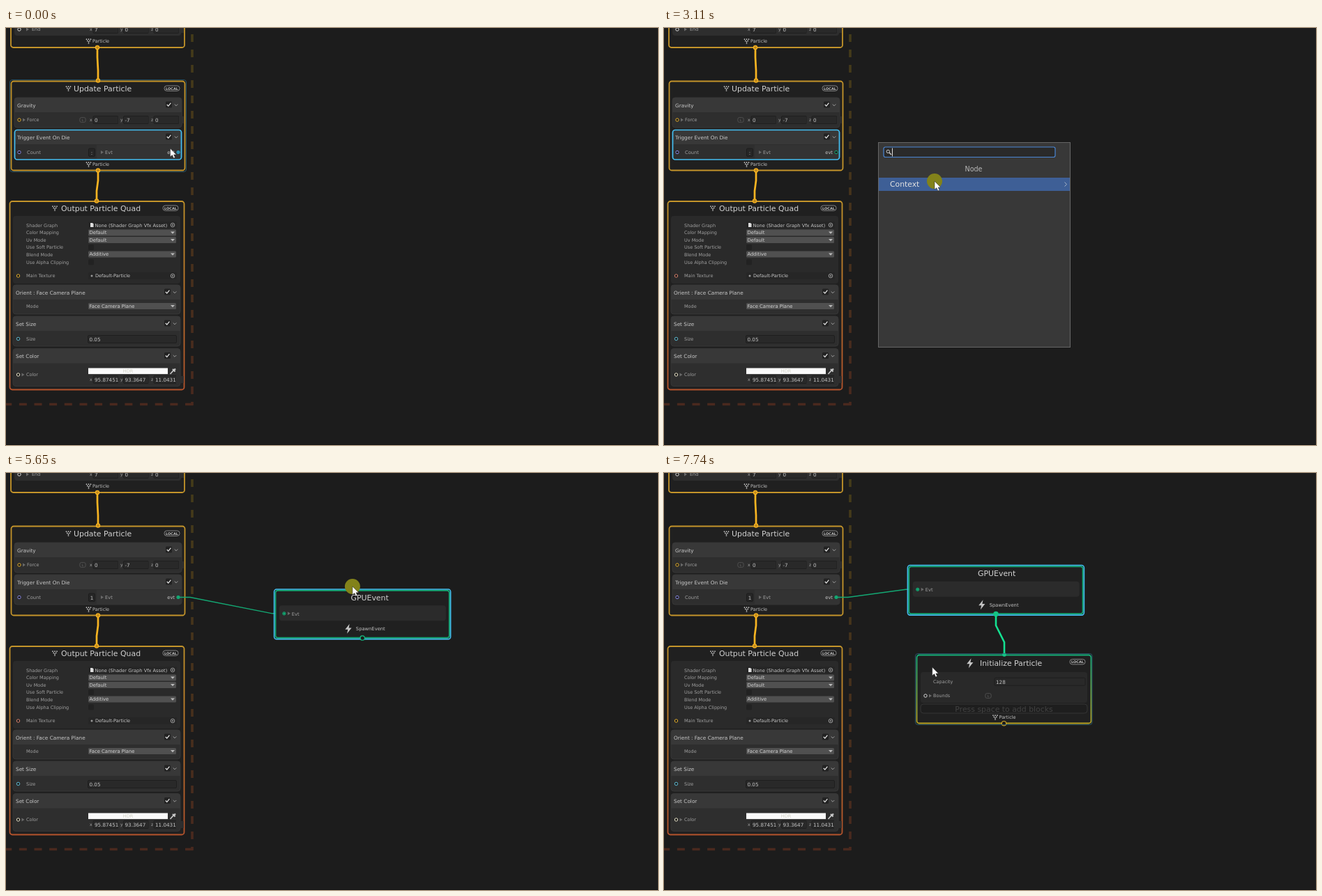
An HTML page that plays this animation: 935x599 px, repeating every 8000 ms.

```html
<!DOCTYPE html>
<html lang="en">
<head>
<meta charset="utf-8">
<title>Node graph</title>
<style>
html, body { margin: 0; width: 100%; height: 100%; overflow: hidden; background: #1c1c1c; }
svg { display: block; width: 100vw; height: 100vh; }
text { font-family: "DejaVu Sans", Verdana, sans-serif; white-space: pre; }
</style>
</head>
<body>
<svg id="stage" viewBox="0 0 935 599"></svg>
<script>
const LOOP = 8000;
const GOLD = '#c4942a', GREEN = '#13a873', BLUE = '#43bdf0', HOVER = '#2c647d', BG = '#1c1c1c';

// ---- markup helpers ----
const rect = (x, y, w, h, fill, more = '') =>
  `<rect x="${x}" y="${y}" width="${w}" height="${h}" fill="${fill}" ${more}/>`;
const frame = (x, y, w, h, stroke, fill = 'none', width = 1.8, more = '') =>
  rect(x, y, w, h, fill, `rx="3.5" stroke="${stroke}" stroke-width="${width}" ${more}`);
const path = (d, stroke, width = 1, more = '') =>
  `<path d="${d}" fill="none" stroke="${stroke}" stroke-width="${width}" ${more}/>`;
// y is the middle of the capitals
const text = (x, y, s, size = 6.5, fill = '#a0a0a0', more = '') =>
  `<text x="${x}" y="${y + size * 0.36}" font-size="${size}" fill="${fill}" ${more}>${s}</text>`;
const group = (id, body, more = '') => `<g id="${id}" ${more}>${body}</g>`;
const MID = 'text-anchor="middle"';

const title = (x, y, s, more) => text(x, y, s, 10.9, '#d2d2d2', more);
const port = (x, y, color, more = '') =>
  `<circle class="port" cx="${x}" cy="${y}" r="2.2" fill="${BG}" stroke="${color}" stroke-width="1" ${more}/>`;
const anchor = (x, y) =>
  `<circle class="anchor" cx="${x}" cy="${y}" r="2.6" fill="#c08a1c" stroke="#f8b422" stroke-width="1.2"/>`;
const tri = (x, y) => `<path d="M${x - 2} ${y - 2.5}l4 2.5l-4 2.5z" fill="#6a6a6a"/>`;
const chevron = (x, y) => path(`M${x - 2.3} ${y - 1}l2.3 2.3l2.3 -2.3`, '#a0a0a0', 1);
const tick = (x, y) => rect(x - 4.5, y - 4.5, 9, 9, '#222', 'rx="1.5"') +
  path(`M${x - 2.7} ${y}l2 2.1l3.6 -4.4`, '#e4e4e4', 1.3);
const local = (x, y) => rect(x, y, 22, 7.4, '#1c1c1c', 'rx="3.5" stroke="#a0a0a0" stroke-width=".8"') +
  text(x + 11, y + 3.7, 'LOCAL', 5, '#c4c4c4', `${MID} font-weight="bold"`);
const space = (x, y) => rect(x - 4.2, y - 3.5, 8.4, 7, 'none', 'rx="2.5" stroke="#565656" stroke-width=".8"') +
  text(x, y, 'L', 4.6, '#686868', MID);
const bolt = (x, y) =>
  `<path transform="translate(${x} ${y})" d="M1.8 -7L-4.5 1H-.6L-1.8 7L4.7 -1.4H.7Z" fill="#c4c4c4"/>`;
const sparks = (x, y) => {
  const dots = [[-3, -2.8], [0, -2.8], [3, -2.8], [-1.7, -.6], [1.7, -.6], [0, .9], [0, 3]];
  return dots.map(([a, b]) => `<circle cx="${x + a}" cy="${y + b}" r=".85" fill="#c8c8c8"/>`).join('');
};
const flow = (x, y) => sparks(x, y) + text(x + 5.5, y, 'Particle', 6.5, '#c0c0c0');
const field = (x, y, w, s, h = 11) =>
  rect(x, y - h / 2, w, h, '#292929', 'rx="1.5" stroke="#1c1c1c" stroke-width=".8"') +
  text(x + 2, y + .5, s, 7.2, '#c4c4c4');
const vector = (y, values) => values.map((v, i) =>
  field(125 + 43.5 * i, y, 36, v) + rect(161 + 43.5 * i, y - 5, 7, 10, '#2e2e2e') +
  text(120 + 44 * i, y, 'xyz'[i], 6, '#808080')).join('') + text(120, y, 'x', 6, '#808080') +
  text(164, y, 'y', 6, '#808080') + text(208, y, 'z', 6, '#808080');
const drop = (y, s) => rect(118, y - 4.5, 126, 9, '#505050', 'rx="1.5"') +
  text(119.5, y, s, 6.8, '#d4d4d4') + `<path d="M236 ${y - 1.5}h6l-3 3.2z" fill="#bbb"/>`;
const block = (x, y, h, s, cx = x + 219.5) =>
  rect(x, y, 240, h, '#2e2e2e', 'rx="4" stroke="#3a3a3a" stroke-width=".8"') +
  `<path d="M${x} ${y + 21}v-17q0 -4 4 -4h232q4 0 4 4v17z" fill="#383838"/>` +
  text(x + 4, y + 11, s, 7.3, '#c8c8c8') + tick(cx + 2, y + 10) + chevron(cx + 12.5, y + 10.5);
const picker = y => `<circle cx="239" cy="${y}" r="2.8" fill="none" stroke="#aaa" stroke-width=".9"/>` +
  `<circle cx="239" cy="${y}" r="1" fill="#aaa"/>`;

// ---- parts ----
function defs() {
  const grad = (id, y1, y2, a, b) =>
    `<linearGradient id="${id}" gradientUnits="userSpaceOnUse" x1="0" x2="0" y1="${y1}" y2="${y2}">` +
    `<stop offset="0" stop-color="${a}"/><stop offset="1" stop-color="${b}"/></linearGradient>`;
  return '<defs>' + grad('outEdge', 249, 520, '#c4942a', '#b5532c') +
    grad('initEdge', 261, 360, '#14b078', '#b8a324') +
    grad('dash', 0, 541, '#443c19', '#4a291e') + '</defs>';
}

function backdrop() {
  return rect(0, 0, 935, 599, BG) + rect(0, 598, 935, 1, '#141414') +
    path('M267 9V542', 'url(#dash)', 3.6, 'stroke-dasharray="11 11"') +
    path('M268 540.5H0', '#4a291e', 3.4, 'stroke-dasharray="11 10.65"');
}

function upperContext() {
  return frame(7, -40, 249, 68, GOLD, '#202020') + rect(12, -30, 239, 41, '#2e2e2e', 'rx="4"') +
    port(19, 2, '#ddd') + tri(31, 2) + text(37, 2, 'End') + vector(2, ['7', '0', '0']) + flow(118.5, 19);
}

function updateContext() {
  return frame(7.5, 76.5, 249, 128, GOLD, '#202020') + sparks(89.5, 87) +
    title(97, 87, 'Update Particle') + local(227, 83) +
    block(12, 100, 43, 'Gravity') + port(19, 132, '#e0ab2c') + tri(26, 132) + text(30, 132, 'Force') +
    space(110, 132) + vector(132, ['0', '-7', '0']) +
    block(12, 146, 43, 'Trigger Event On Die') + rect(130, 168, 121, 20, '#333') +
    port(19, 178.5, '#8685e0') + text(30, 179, 'Count', 6.7) +
    rect(118.5, 173, 9, 11.5, '#262626', 'rx="1.5" stroke="#1a1a1a" stroke-width=".8"') +
    text(123, 179.3, '', 7.2, '#c8c8c8', `id="count" ${MID}`) +
    tri(138, 178.5) + text(142, 179, 'Evt', 6.7) + text(242, 179, 'evt', 6.7, '#c8c8c8', 'text-anchor="end"') +
    port(247, 178.5, GREEN, 'id="evtPort"') +
    frame(12.5, 146.5, 239, 42.5, BLUE, 'none', 1.7, 'id="blockSel"') + flow(118.5, 196) +
    frame(5.5, 74.5, 253, 132, HOVER, 'none', .8, 'id="updHover"');
}

function outputContext() {
  const labels = ['Shader Graph', 'Color Mapping', 'Uv Mode', 'Use Soft Particle', 'Blend Mode', 'Use Alpha Clipping'];
  const y = i => 283.3 + 10.6 * i;
  const box = i => rect(118, y(i) - 4, 8, 8, '#222', 'rx="1.5"');
  return frame(5.5, 249, 250, 270.5, 'url(#outEdge)', '#202020') + sparks(70, 259) +
    title(79, 259, 'Output Particle Quad') + local(225, 255) +
    rect(10, 270, 240, 97, '#2a2a2a', 'rx="4"') +
    labels.map((s, i) => text(29, y(i), s)).join('') +
    rect(118, 278, 127, 10, '#262626', 'rx="1.5"') +
    '<path d="M121 280h3l1.5 1.5v4.5h-4.5z" fill="#ddd"/>' +
    text(127.5, 283.3, 'None (Shader Graph Vfx Asset)', 6.65, '#c8c8c8') + picker(283) +
    drop(294, 'Default') + drop(304.6, 'Default') + box(3) + drop(325, 'Additive') + box(5) +
    port(17.5, 356, '#e0ab2c', 'id="texPort"') + text(29, 356, 'Main Texture') +
    rect(118, 351, 127, 10, '#262626', 'rx="1.5"') +
    '<circle cx="123" cy="356" r="1.5" fill="#999"/>' +
    text(128, 356, 'Default-Particle', 6.5, '#c8c8c8') + picker(356) +
    block(10, 369, 42, 'Orient : Face Camera Plane') + text(29, 400, 'Mode') + drop(399.5, 'Face Camera Plane') +
    block(10, 414, 43, 'Set Size') + port(17.5, 446.5, '#62c4dc') + text(29, 447, 'Size') +
    field(117.5, 447, 127, '0.05') +
    block(10, 460.5, 54, 'Set Color') + port(17.5, 498, '#e8e2c8') + tri(24.5, 498) + text(29, 498, 'Color') +
    rect(118, 488.5, 114, 8.6, '#fafafa') + text(175, 493, 'HDR', 6.5, '#d2d2c6', MID) +
    path('M235.5 497l4.5 -5', '#ccc', 1.6) + path('M239 490l3.5 3.5M241 491.5l2 -2', '#ccc', 2.2) +
    vector(505, ['95.87451', '93.3647', '11.04314']) + rect(244, 499, 5, 12, '#2e2e2e');
}

function goldLinks() {
  const style = 'stroke-linejoin="round"';
  return path('M131 28V42L132 61V75', '#f8b422', 2.7, style) +
    path('M132 205V219L130 234V248', '#f8b422', 2.7, style) +
    anchor(131, 28) + anchor(132, 75.5) + anchor(132, 204.5) + anchor(130, 248.5);
}

function eventNode() {
  return frame(448.5, 211.5, 249.5, 68, GREEN, '#202020', 2) +
    group('evTitle', title(574.5, 221.5, 'GPUEvent', MID)) +
    rect(454, 233, 239, 22, '#2b2b2b', 'rx="4"') +
    port(461, 244.5, GREEN, 'id="evIn"') + `<circle class="port" cx="461" cy="244.5" r="1.7" fill="${GREEN}"/>` +
    tri(468, 244.5) + text(472, 245, 'Evt', 6.7) +
    bolt(553, 266.5) + text(564, 266.5, 'SpawnEvent', 6.75, '#c0c0c0') +
    frame(446.7, 209.7, 253, 71.6, BLUE, 'none', 1.6, 'id="evSel"') +
    frame(446.7, 209.7, 253, 71.6, HOVER, 'none', .8, 'id="evHover"') +
    `<circle id="evOut" cx="573.3" cy="279.7" r="3.2" stroke="#16c184" stroke-width="1.2"/>`;
}

function initNode() {
  return frame(362.5, 261.5, 250, 98, 'url(#initEdge)', '#202020', 1.8) +
    bolt(438.7, 273.3) + title(453, 273.5, 'Initialize Particle') + local(582, 267.5) +
    rect(368, 286, 239, 44, '#292929', 'rx="4"') +
    text(386, 300, 'Capacity') + field(474, 299.8, 130, '128') +
    port(375, 320, '#ddd') + tri(382, 320) + text(386, 320, 'Bounds') + space(465, 320) +
    rect(368, 332, 239, 13, '#1e1e1e', 'rx="4" stroke="#343434" stroke-width="1"') +
    text(487.5, 338.8, 'Press space to add blocks', 10.9, '#424242', MID) + flow(475, 351) +
    path('M476 203V219L488 243V261', '#14e091', 2.6, 'stroke-linejoin="round"') +
    '<circle cx="476.3" cy="202.6" r="2.8" fill="#14c484"/><circle cx="488" cy="261" r="2.8" fill="#14c484"/>' +
    `<circle cx="487.5" cy="359.7" r="3.2" fill="${BG}" stroke="#d0a524" stroke-width="1.2"/>` +
    frame(360.5, 259.5, 253.5, 102, HOVER, 'none', .8, 'id="initHover"');
}

function popup() {
  return rect(.5, .5, 275, 294, '#383838', 'stroke="#666" stroke-width="1"') +
    rect(8, 7, 246, 14.5, '#2a2a2a', 'rx="2.5" stroke="#4a86d4" stroke-width="1.2"') +
    '<circle cx="14.3" cy="13.4" r="2.2" fill="none" stroke="#ccc"/>' + path('M16 15l3 3', '#ccc', 1.4) +
    rect(20, 8.5, 1, 12, '#ddd') + text(137, 38.5, 'Node', 9.6, '#b8b8b8', MID) +
    rect(1, 51, 274, 19, '#3e5f96', 'id="rowLit"') + text(17, 60.5, 'Context', 10.8, '#e0e0e0') +
    path('M267.5 57.5l3 3l-3 3', '#a8b4c8', 1);
}

const pointer = group('press', '<circle r="11" fill="#82821a"/>') +
  '<path d="M0 0V12L2.9 9.6L4.9 14L7 13L5.1 8.9H8.8Z" fill="#fff" stroke="#222" stroke-width=".5"/>';

document.getElementById('stage').innerHTML = defs() + backdrop() + upperContext() + updateContext() +
  outputContext() + goldLinks() + path('', GREEN, 1.5, 'id="evLink"') + path('', '#1b5f4a', 1.5, 'id="dragLink"') +
  group('event', eventNode()) + path('', '#14a672', 2.6, 'id="flowLink"') + group('init', initNode()) +
  group('popup', popup()) + group('pointer', pointer);

// ---- motion ----
const EASE = {
  both: p => p * p * (3 - 2 * p),
  start: p => p ** 1.4,
  end: p => 1 - (1 - p) ** 2
};
// time, x, y, easing towards this key
const POINTER = [
  [30, 235.5, 173], [280, 246, 178, 'both'], [670, 246, 178], [930, 398, 184, 'start'], [1460, 445, 181, 'end'],
  [1960, 445, 181], [2210, 396.5, 215, 'start'], [2760, 388, 220, 'end'], [3930, 388, 220],
  [4700, 568, 279, 'both'], [4910, 568, 279], [5160, 559, 218, 'both'], [5380, 559, 218],
  [5650, 497, 163, 'start'], [6170, 461, 141, 'end'], [6190, 461, 141], [6520, 475.5, 202.5, 'both'],
  [6690, 475.5, 202.5], [6950, 473, 233, 'both'], [7060, 473, 233], [7480, 384.7, 279, 'both']
];
const EVENT = [[5380, 0, 0], [5650, -62, -42.5, 'start'], [6170, -97.3, -77.2, 'end']];

function at(keys, t) {
  const i = keys.findIndex(k => k[0] > t);
  if (i === 0) return keys[0].slice(1, 3);
  if (i < 0) return keys[keys.length - 1].slice(1, 3);
  const [t0, x0, y0] = keys[i - 1], [t1, x1, y1, ease] = keys[i];
  const p = (EASE[ease] || EASE.both)((t - t0) / (t1 - t0));
  return [x0 + (x1 - x0) * p, y0 + (y1 - y0) * p];
}

const el = id => document.getElementById(id);
const show = (id, on) => { el(id).style.display = on ? '' : 'none'; };
const move = (id, x, y) => el(id).setAttribute('transform', `translate(${x} ${y})`);
const within = (t, ...spans) => spans.some(([a, b]) => t >= a && t < b);
const ports = document.querySelectorAll('.port'), anchors = document.querySelectorAll('.anchor');

function draw(t) {
  const [x, y] = at(POINTER, t);
  const [ex, ey] = at(EVENT, t);
  const inside = (l, top, r, b) => x > l && x < r && y > top && y < b;
  const evtDrag = within(t, [680, 1600]), flowDrag = within(t, [6700, 7060]);
  const made = t >= 3260, done = t >= 7590, selected = t >= 5390;
  const open = within(t, [1600, 3260], [7060, 7590]);

  move('pointer', x, y);
  show('press', within(t, [670, 1570], [3110, 3200], [5380, 6190], [6690, 7030], [7510, 7590]));

  const dim = evtDrag || flowDrag;
  ports.forEach(p => { p.style.opacity = dim ? .15 : 1; });
  anchors.forEach(a => { a.style.opacity = dim ? .55 : 1; });
  el('texPort').setAttribute('stroke', t < 1600 || t >= 7060 ? '#e0ab2c' : '#d8806c');
  el('evtPort').setAttribute('fill', made ? GREEN : t < 680 ? '#2c8fb0' : BG);
  el('evtPort').setAttribute('stroke', t < 680 ? '#2c8fb0' : GREEN);
  el('count').textContent = made ? '1' : ':';

  show('blockSel', !selected);
  show('updHover', !open && inside(5, 74, 259, 207));

  show('dragLink', evtDrag);
  el('dragLink').setAttribute('d', `M247 178.5H264L${Math.max(264, x - 12)} ${y - .5}L${x} ${y}`);

  show('event', made);
  move('event', ex, ey);
  move('evTitle', at(EVENT, t - 30)[0] - ex, 0);
  show('evSel', selected);
  show('evHover', !selected && inside(446, 209, 701, 283));
  el('evOut').setAttribute('fill', t >= 6480 ? '#14b87c' : BG);
  show('evLink', made);
  el('evLink').setAttribute('d', `M247 178.5H264L${444 + ex} ${244.5 + ey}H${461 + ex}`);

  show('flowLink', flowDrag);
  el('flowLink').setAttribute('d', `M476 203L${x} ${y}`);
  show('init', done);
  show('initHover', done && inside(360, 259, 614, 362));

  const [px, py] = t < 5000 ? [307, 164] : [335, 213];
  show('popup', open);
  move('popup', px, py);
  show('rowLit', y > py + 47);
}

const begin = performance.now();
function tickFrame() {
  draw((performance.now() - begin) % LOOP);
  requestAnimationFrame(tickFrame);
}
tickFrame();
</script>
</body>
</html>
```
